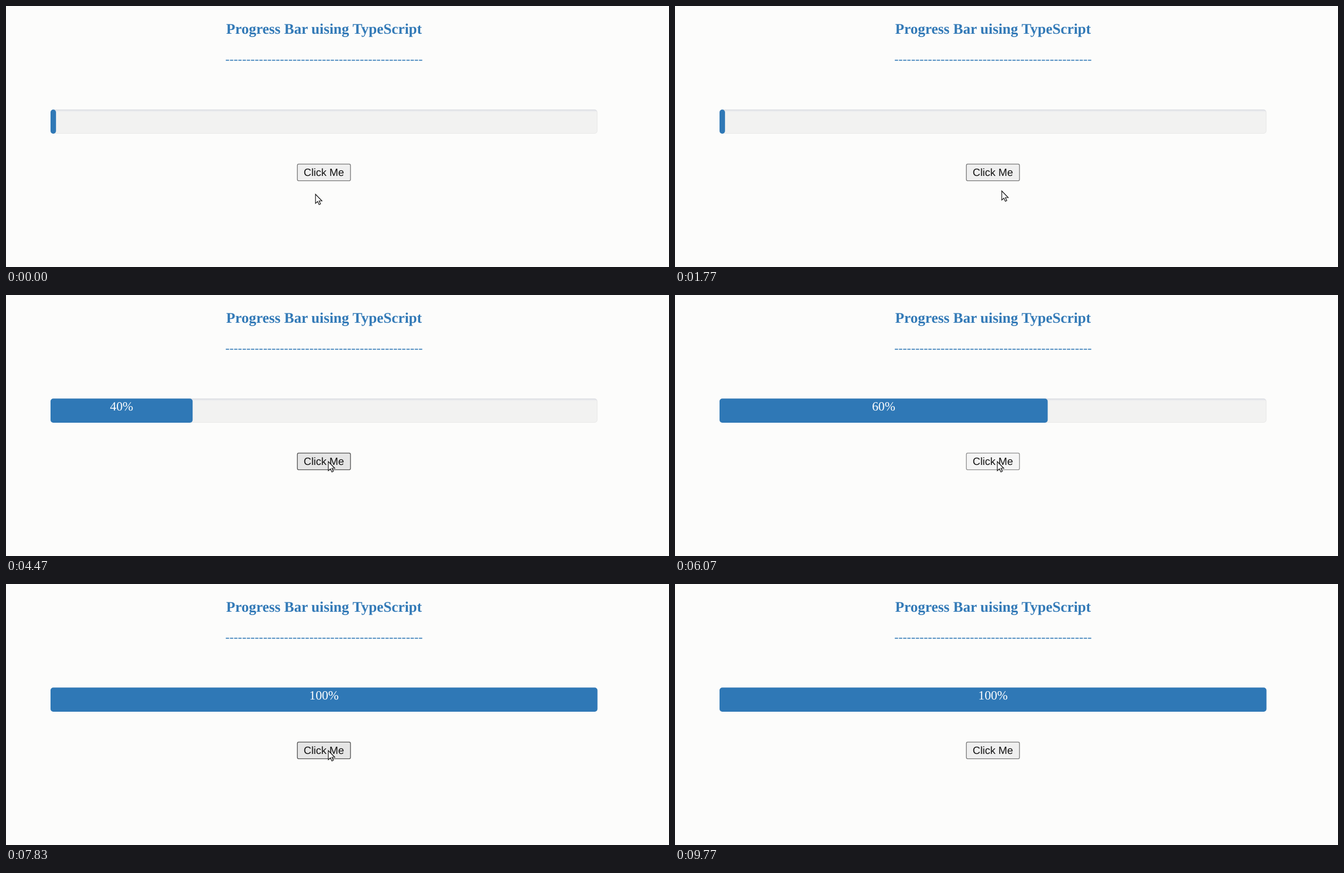
These frames come from a looping animation (1191x470 px, 9810 ms). An HTML page:

```html
<!DOCTYPE html>
<html lang="en">
<head>
<meta charset="utf-8">
<title>Progress bar</title>
<style>
html, body { margin: 0; width: 100%; height: 100%; overflow: hidden; background: #fcfcfb; }
svg { display: block; width: 100%; height: 100%; }
text { text-anchor: middle; text-rendering: geometricPrecision; }
.serif { font-family: "Liberation Serif", "Times New Roman", serif; font-size: 22.67px; }
.title { font-size: 26.5px; font-weight: bold; }
.sans { font-family: "Liberation Sans", Arial, sans-serif; font-size: 18.9px; }
</style>
</head>
<body>
<svg viewBox="0 0 1191 470">
  <defs>
    <linearGradient id="inset" x1="0" y1="0" x2="0" y2="1">
      <stop offset="0" stop-color="#dcdfe6"/>
      <stop offset=".1" stop-color="#f2f2f1"/>
    </linearGradient>
  </defs>
  <rect width="1191" height="470" fill="#fcfcfb"/>
  <g fill="#337ab7">
    <text class="serif title" x="571.3" y="50">Progress Bar uising TypeScript</text>
    <text class="serif" id="rule" x="571.3" y="103"></text>
  </g>
  <rect x="80" y="186.5" width="982.5" height="43.5" rx="5" fill="url(#inset)"/>
  <rect x="80.5" y="187" width="981.5" height="42.5" rx="5" fill="none" stroke="#000" stroke-opacity=".04"/>
  <rect id="bar" x="80" y="186.5" height="43.5" rx="5" fill="#2f78b6"/>
  <text class="serif" id="label" y="207.5" fill="#fff"></text>
  <rect id="button" x="523.4" y="284.7" width="95.4" height="30" rx="2.5" stroke-width="1.3"/>
  <text class="sans" x="571" y="306" fill="#111">Click Me</text>
  <path id="cursor" d="M0 0V16.5L3.8 13L6.4 18.7L9 17.5L6.5 12H11.6Z" fill="#fff" stroke="#111" stroke-width="1.2"/>
</svg>
<script>
const LOOP = 9810, TRACK = 982.5, GROW = 600, PRESS = 110;
const CLICKS = [3370, 4350, 5250, 6130, 7030];
// time, x, y of the pointer tip
const PATH = [[0, 556, 339], [500, 556, 339], [1600, 587, 333], [2000, 587, 333],
  [2800, 579, 300], [8300, 579, 300], [9100, 600, 480], [LOOP, 600, 480]];
const LOOKS = {
  idle: ["#efefef", "#767676"],
  hover: ["#e5e5e5", "#4f4f4f"],
  press: ["#f5f5f5", "#8d8d8d"]
};

const $ = id => document.getElementById(id);
const set = (el, attrs) => { for (const k in attrs) el.setAttribute(k, attrs[k]); };
const mix = (a, b, p) => a + (b - a) * p;
const smooth = p => p * p * (3 - 2 * p);
const bezier = (a, b, s) => 3 * (1 - s) ** 2 * s * a + 3 * (1 - s) * s * s * b + s ** 3;

// CSS "ease"
function ease(x) {
  if (x >= 1) return 1;
  let lo = 0, hi = 1;
  for (let i = 0; i < 24; i++) {
    const mid = (lo + hi) / 2;
    if (bezier(.25, .25, mid) < x) lo = mid; else hi = mid;
  }
  return bezier(.1, 1, lo);
}

function pointer(t) {
  const i = Math.max(1, PATH.findIndex(p => p[0] > t));
  const [t0, x0, y0] = PATH[i - 1], [t1, x1, y1] = PATH[i];
  const p = smooth((t - t0) / (t1 - t0));
  return [mix(x0, x1, p), mix(y0, y1, p)];
}

function draw(t) {
  const count = CLICKS.filter(c => c <= t).length;
  const level = n => n ? n * 20 : 1;
  const pct = count
    ? mix(level(count - 1), level(count), ease((t - CLICKS[count - 1]) / GROW))
    : 1;
  const width = TRACK * pct / 100;
  set($("bar"), { width, rx: Math.min(5, width / 2) });
  set($("label"), { x: 80 + width / 2 });
  $("label").textContent = count ? level(count) + "%" : "";

  const [x, y] = pointer(t);
  const over = x > 523 && x < 619 && y > 284 && y < 315;
  const down = CLICKS.some(c => t >= c - PRESS && t < c);
  const [fill, stroke] = LOOKS[down ? "press" : over ? "hover" : "idle"];
  set($("button"), { fill, stroke });
  set($("cursor"), { transform: `translate(${x} ${y})` });
}

$("rule").textContent = "-".repeat(47);
const start = performance.now();
function tick() {
  draw((performance.now() - start) % LOOP);
  requestAnimationFrame(tick);
}
tick();
</script>
</body>
</html>
```
